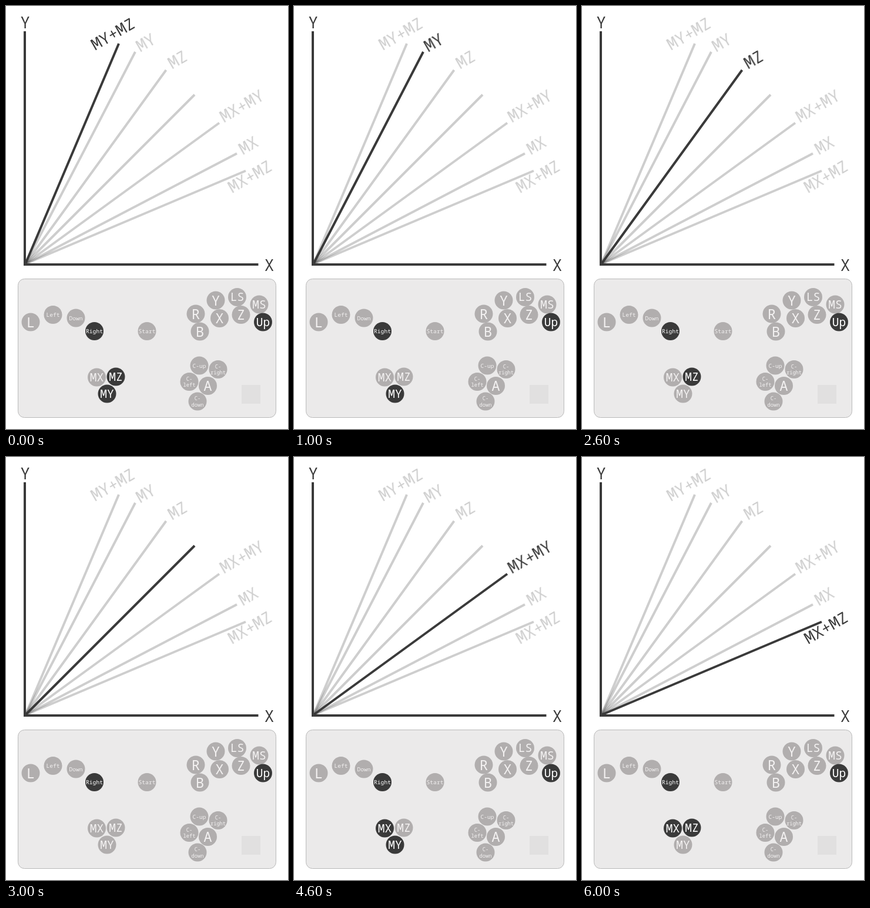
An HTML page that plays this animation: 480x720 px, repeating every 7000 ms.

```html
<!DOCTYPE html>
<html lang="en">
<head>
<meta charset="utf-8">
<title>Modifier angles</title>
<style>
  html, body { margin: 0; height: 100%; overflow: hidden; background: #fff; }
  svg { display: block; width: 480px; height: 720px; }
  text { font-family: "Noto Sans Mono", "DejaVu Sans Mono", monospace; text-anchor: middle; }
  .ray { opacity: .25; stroke: none; fill: #3a3a3a; }
  .ray line { stroke: #3a3a3a; stroke-width: 4; }
  .ray.on { opacity: 1; }
  .button circle { fill: #b1aeae; }
  .button text { fill: #f3f1f1; }
  .button.on circle { fill: #3a3a3a; }
  .button.on text { fill: #fff; }
</style>
</head>
<body>
<svg id="stage" viewBox="0 0 480 720">
  <rect x="20.5" y="464.5" width="439" height="236" rx="11" fill="#ebeaea" stroke="#b9b9b9"/>
  <rect x="401" y="645" width="32" height="32" fill="#e1e0e0"/>
</svg>
<script>
const stage = document.getElementById('stage');
const LABEL_SIZE = 27;

// label, line end, label centre
const rays = [
  ['MY+MZ', 192, 64, 182, 47.5],
  ['MY', 220, 78, 238, 62.5],
  ['MZ', 272.5, 109, 292, 91],
  ['', 321, 151, 0, 0],
  ['MX+MY', 363, 199, 401.5, 170.5],
  ['MX', 393, 251, 412.5, 237],
  ['MX+MZ', 408, 280.5, 415.5, 290.5]
];

const buttons = [
  ['L', 42, 538], ['Left', 80, 525.5], ['Down', 119, 531], ['Right', 150.5, 553.5],
  ['Start', 240, 553.5], ['Y', 357, 501], ['LS', 393.5, 495.5], ['MS', 431, 508],
  ['R', 323, 524], ['X', 363.5, 531.5], ['Z', 400, 525.5], ['Up', 437.5, 538],
  ['B', 330, 554], ['MX', 154.5, 632], ['MZ', 187, 631], ['MY', 172, 660],
  ['C-up', 329, 612], ['C- right', 361, 618.5], ['C- left', 312, 639.5],
  ['A', 343.5, 646.5], ['C- down', 326, 673]
];

function add(parent, tag, attrs, content = '') {
  const node = document.createElementNS('http://www.w3.org/2000/svg', tag);
  for (const key in attrs) node.setAttribute(key, attrs[key]);
  node.textContent = content;
  return parent.appendChild(node);
}

// Centres capitals vertically on (x, y).
function addText(parent, content, x, y, size, attrs = {}) {
  add(parent, 'text', { x, y: y + size * 0.357, 'font-size': size, ...attrs }, content);
}

const rayNodes = rays.map(([label, x2, y2, x, y]) => {
  const group = add(stage, 'g', { class: 'ray' });
  add(group, 'line', { x1: 33, y1: 439, x2, y2 });
  addText(group, label, x, y, LABEL_SIZE, { transform: `rotate(-30 ${x} ${y})` });
  return group;
});

add(stage, 'path', { d: 'M32 43V440H429.5', fill: 'none', stroke: '#3a3a3a', 'stroke-width': 4 });
addText(stage, 'Y', 32.5, 28.5, LABEL_SIZE, { fill: '#3a3a3a' });
addText(stage, 'X', 448, 441, LABEL_SIZE, { fill: '#3a3a3a' });

const buttonNodes = buttons.map(([label, cx, cy]) => {
  const group = add(stage, 'g', { class: 'button' });
  add(group, 'circle', { cx, cy, r: 15.5 });
  const lines = label.split(' ');
  if (lines.length > 1) {
    lines.forEach((line, i) => addText(group, line, cx, cy - 5 + i * 10.5, 8.7, { 'font-weight': 500 }));
  } else if (label.length > 2) {
    addText(group, label, cx, cy + 0.5, 9.6, { 'font-weight': 500 });
  } else {
    addText(group, label, cx, cy, label.length > 1 ? 19.5 : 24);
  }
  return group;
});

function draw(now) {
  const active = Math.floor(now / 1000) % rays.length;
  const pressed = ['Right', 'Up', ...rays[active][0].split('+')];
  rayNodes.forEach((node, i) => node.classList.toggle('on', i === active));
  buttonNodes.forEach((node, i) => node.classList.toggle('on', pressed.includes(buttons[i][0])));
}

const start = performance.now();
function tick() {
  draw(performance.now() - start);
  requestAnimationFrame(tick);
}
tick();
</script>
</body>
</html>
```
